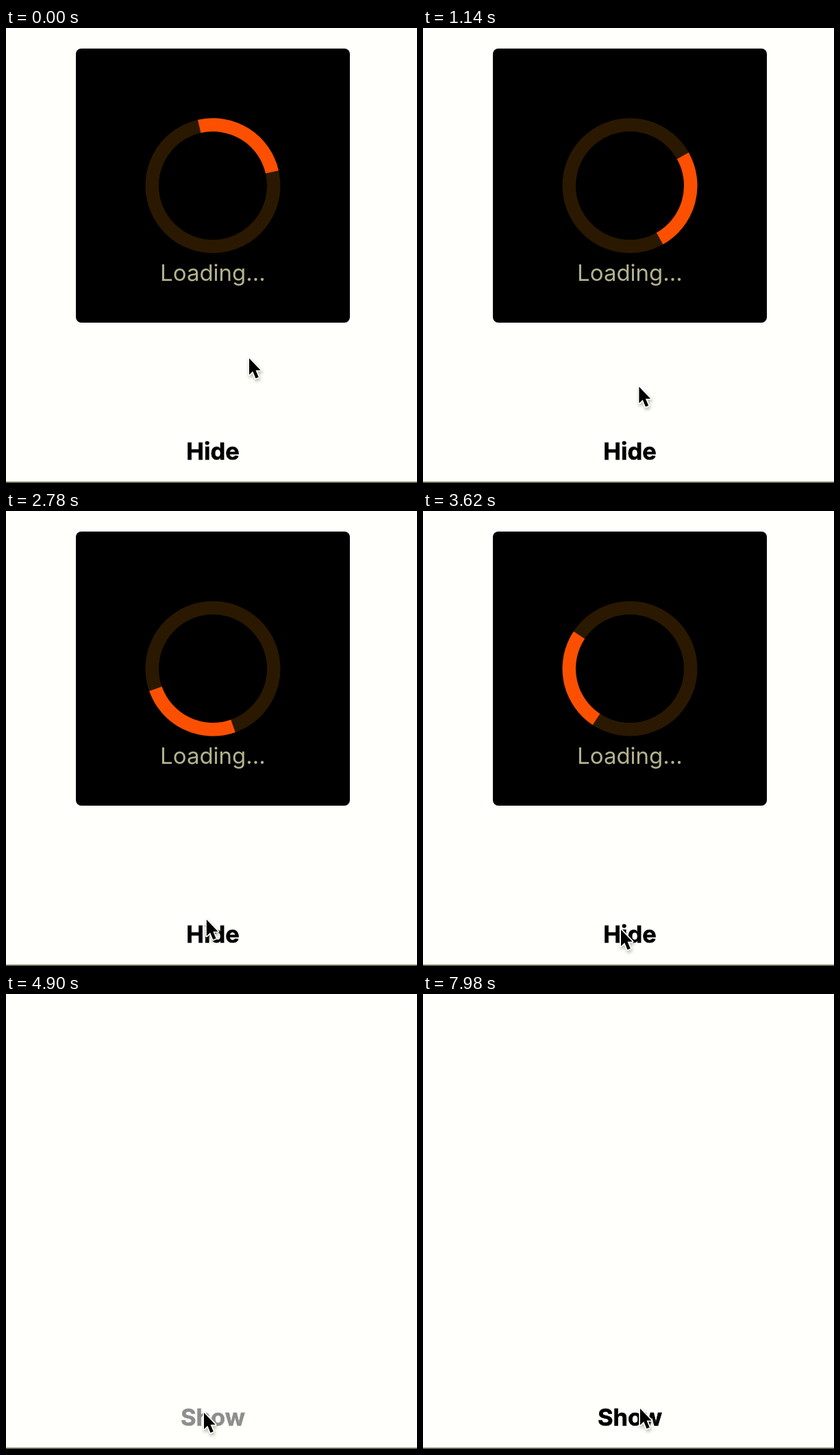
Write an HTML page that moves like this. It is 600x664 px and loops after 8000 ms.

```html
<!DOCTYPE html>
<html lang="en">
<head>
<meta charset="utf-8">
<title>Loading card</title>
<style>
  html, body { margin: 0; width: 100%; height: 100%; overflow: hidden; background: #fffffc; }
  svg { display: block; width: 600px; height: 664px; }
  text { font-family: Inter, sans-serif; text-anchor: middle; }
  .loading { font-size: 33px; fill: #b3b38e; }
  .button { font-size: 34.5px; font-weight: 700; stroke: #000; stroke-width: .6; }
  .ring { fill: none; stroke-width: 19.5; }
  #cursor { filter: drop-shadow(1px 3px 2px rgba(70, 70, 20, .35)); }
</style>
</head>
<body>
<svg viewBox="0 0 600 664">
  <rect y="662" width="600" height="2" fill="#6b6b50"/>
  <g id="card">
    <rect x="102" y="30" width="400" height="400" rx="8"/>
    <circle class="ring" cx="302" cy="230" r="88.75" stroke="#2a1900"/>
    <path id="arc" class="ring" d="M302 141.25A88.75 88.75 0 0 1 390.75 230" stroke="#fc5000"/>
    <text class="loading" x="302" y="368.5">Loading...</text>
  </g>
  <text id="button" class="button" x="302" y="629.5">Hide</text>
  <g id="cursor">
    <path d="M0 0V24l5.3-5 4.2 10.3 4.3-1.8-4.3-10h7.2z"
          stroke="#fff" stroke-width="3.4" stroke-linejoin="round" paint-order="stroke"/>
  </g>
</svg>
<script>
  const DURATION = 8000;
  const PRESS_STEP = 95;
  const HIDE_STEP = 102;
  const $ = id => document.getElementById(id);
  const [card, arc, button, cursor] = ['card', 'arc', 'button', 'cursor'].map($);

  const progress = (step, from, to) => Math.min(1, Math.max(0, (step - from) / (to - from)));

  // The picture advances three times per 140 ms: after 20, 100 and 20 ms.
  function stepAt(time) {
    const rest = time % 140;
    return 3 * Math.floor(time / 140) + (rest >= 20) + (rest >= 120);
  }

  // A sweep down to the left, a curved approach to the button, a late nudge.
  function pointerAt(step) {
    const sweep = progress(step, 0, 40);
    const approach = 1 - (1 - progress(step, 40, 75)) ** 1.7;
    const nudge = progress(step, 166, 171);
    return {
      x: 355 - 88 * sweep ** 1.7 + 22 * approach + 13 * Math.sin(Math.PI * approach) + 28 * nudge,
      y: 482 + 73 * sweep ** 1.2 + 56 * approach - 6 * nudge
    };
  }

  // The label dims while pressed and recovers after release.
  function labelOpacity(step) {
    const dim = progress(step, PRESS_STEP, PRESS_STEP + 4);
    const recover = progress(step, HIDE_STEP, HIDE_STEP + 10);
    return 1 - 0.8 * (dim - recover);
  }

  function draw(time) {
    const step = stepAt(time);
    const hidden = step >= HIDE_STEP;
    const { x, y } = pointerAt(step);
    card.style.display = hidden ? 'none' : '';
    button.textContent = hidden ? 'Show' : 'Hide';
    button.setAttribute('opacity', labelOpacity(step));
    arc.setAttribute('transform', `rotate(${2.94 * step - 12.9} 302 230)`);
    cursor.setAttribute('transform', `translate(${x} ${y})`);
  }

  const start = performance.now();
  function tick() {
    draw((performance.now() - start) % DURATION);
    requestAnimationFrame(tick);
  }
  tick();
</script>
</body>
</html>
```
